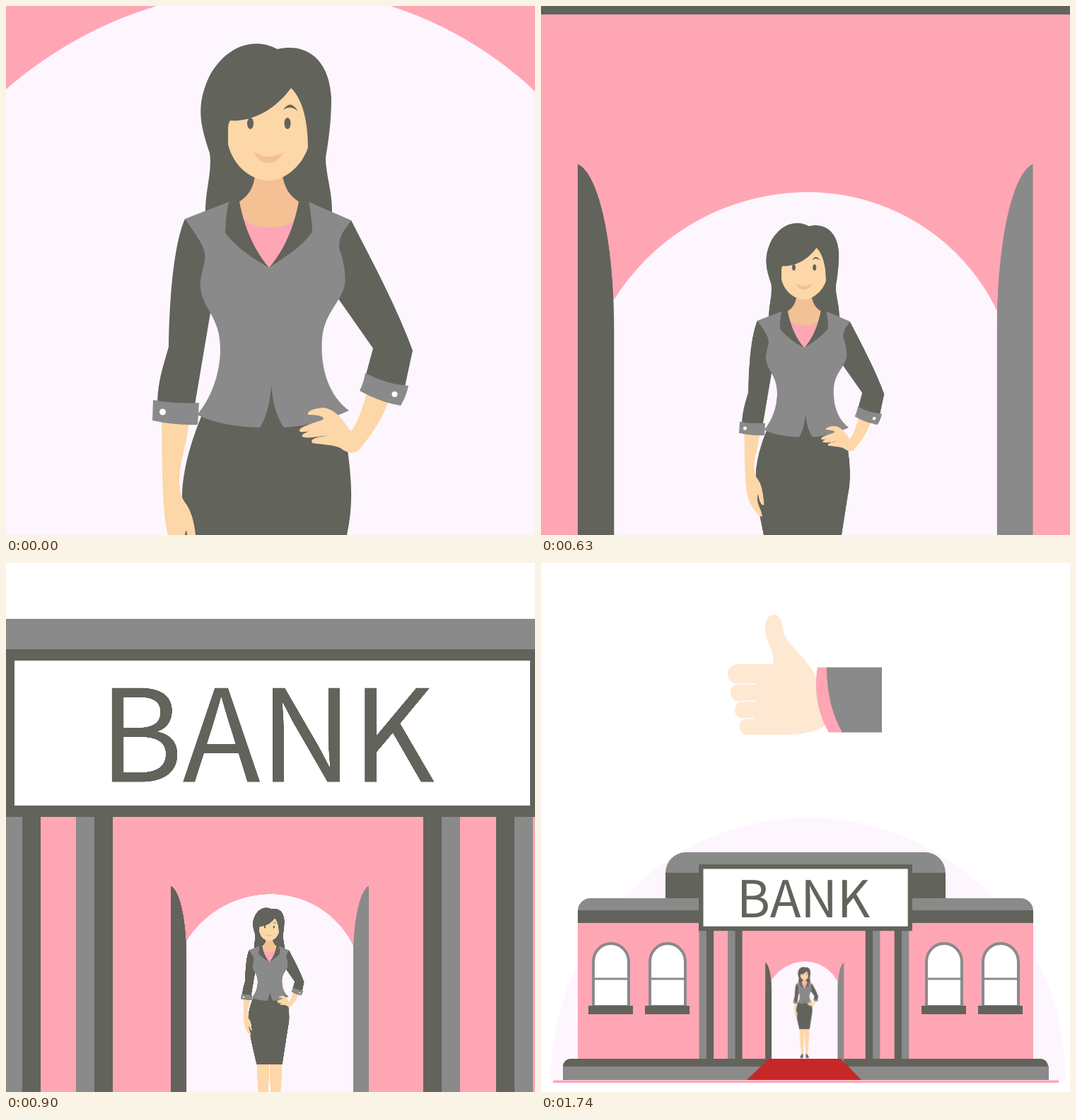
Animation of 748 by 748 pixels, one loop 3.42 s. Source, as an HTML page without scripts:

```html
<!DOCTYPE html>
<html lang="en">
<head>
<meta charset="utf-8">
<title>Bank</title>
<style>
  html, body { margin: 0; width: 100%; height: 100%; overflow: hidden; background: #fff; }
  svg { display: block; width: 100vw; height: 100vh; }

  .dark { fill: #62635b; }
  .gray { fill: #8a8a8a; }
  .pink { fill: #ffa6b5; }
  .pale { fill: #fef6fe; }
  .skin { fill: #fdd7a8; }
  .tan { fill: #f3c194; }
  .white { fill: #fff; }

  .sign {
    font: 400 72px "Noto Sans CJK JP", "Noto Sans CJK SC", "Noto Sans CJK", "Open Sans", sans-serif;
    letter-spacing: -.4px;
    text-rendering: geometricPrecision;
  }

  .zoom, .thumb, .carpet { animation: 3420ms linear -3ms infinite; }
  .zoom { transform-origin: 372.5px 626.3px; animation-name: zoom; }
  .doors { transform-origin: 372.5px 636.3px; }
  .thumb { transform-origin: 373px 159px; animation-name: thumb; }
  .carpet { fill: #c62828; animation-name: unroll; }

  /* camera pulls back at 30 ms per step */
  @keyframes zoom {
    0% { transform: scale(10.39); }
    7.018% { transform: scale(10.39); animation-timing-function: steps(13, end); }
    18.421% { transform: scale(5.79); animation-timing-function: steps(12, end); }
    28.947% { transform: scale(1.43); animation-timing-function: step-end; }
    29.825%, 100% { transform: scale(1); }
  }
  @keyframes thumb {
    0% { transform: rotate(36deg) scale(0); }
    35.088% { transform: rotate(36deg) scale(0); animation-timing-function: cubic-bezier(.215, .61, .355, 1); }
    50.877%, 100% { transform: none; }
  }
  @keyframes unroll {
    0%, 35.088% { d: path("M326 701L420 701L415 701L331 701Z"); }
    50.877%, 100% { d: path("M322 701L424 701L453 731L291 731Z"); }
  }
</style>
</head>
<body>
<svg viewBox="0 0 748 748">
  <defs>
    <g id="window">
      <path d="M7 91V28A25 26 0 0 1 57 28V91Z" fill="#fff" stroke="#8a8a8a" stroke-width="4"/>
      <rect class="gray" x="7" y="50.5" width="50" height="3"/>
      <rect class="dark" y="90" width="63" height="12"/>
    </g>
    <g id="pillar">
      <rect class="gray" width="10.4" height="182"/>
      <rect class="dark" x="10.3" width="10.3" height="182"/>
    </g>
    <g id="leg">
      <path class="skin" d="M301 960C298 1100 318 1200 326 1345H352C356 1200 372 1100 371 960Z"/>
      <path class="dark" d="M326 1345L352 1325V1390H306Q310 1370 326 1345Z"/>
    </g>
  </defs>

  <path class="pale" d="M14 732A364 372 0 0 1 742 732Z"/>

  <g class="zoom">
    <path class="gray" d="M176 438A29 29 0 0 1 205 409H543A29 29 0 0 1 572 438Z"/>
    <rect class="dark" x="176" y="438" width="396" height="36"/>
    <path class="gray" d="M52 492A18 18 0 0 1 70 474H678A18 18 0 0 1 696 492Z"/>
    <rect class="dark" x="52" y="491" width="644" height="18"/>
    <rect class="pink" x="52" y="509" width="644" height="193"/>

    <use href="#window" x="67" y="536"/>
    <use href="#window" x="147" y="536"/>
    <use href="#window" x="538" y="536"/>
    <use href="#window" x="618" y="536"/>

    <path class="pale" d="M325.9 590A55.9 55.9 0 0 1 373.4 563.6A51.2 51.2 0 0 1 419.6 592.7V702H325.9Z"/>

    <use href="#pillar" x="223.5" y="520"/>
    <use href="#pillar" x="264" y="520"/>
    <use href="#pillar" transform="matrix(-1 0 0 1 479.4 520)"/>
    <use href="#pillar" transform="matrix(-1 0 0 1 520.3 520)"/>

    <rect class="dark" x="223" y="426.2" width="302" height="94"/>
    <rect class="white" x="229.5" y="432.5" width="289.2" height="81.3"/>
    <text class="sign dark" x="276.8" y="500.6">BANK</text>

    <path class="gray" d="M31 711H718V731H31Z"/>
    <path class="dark" d="M31 712A11 11 0 0 1 42 701H706A11 11 0 0 1 717 712Z"/>
    <rect class="pink" x="17" y="731.5" width="715" height="3.5"/>
  </g>

  <g class="zoom doors">
    <path class="dark" d="M317.1 565C322 567 326 583 326 606V702L317.1 711Z"/>
    <path class="gray" d="M428.3 565C423.5 567 419.5 583 419.5 606V702L428.3 711Z"/>
  </g>

  <g class="zoom">
    <!-- woman, drawn at close-up size -->
    <g transform="translate(372.5 626.3) scale(.09625) translate(-372.5 -626.3)">
      <use href="#leg"/>
      <use href="#leg" transform="matrix(-1 0 0 1 745 0)"/>
      <path class="dark" d="M285 560L375 528L460 560L483 628C490 680 490 710 482 748L448 966H297C262 820 250 760 249 700C248 660 262 610 285 560Z"/>

      <path class="dark" d="M384 61C340 38 300 70 285 105C268 145 276 172 288 208C292 235 281 262 282 295H461C462 262 452 240 452 214C458 180 460 155 460 130C457 75 425 52 384 61Z"/>
      <path class="pink" d="M328 285H416L414 330L372 370L330 330Z"/>
      <path class="tan" d="M352 240C349 262 340 270 328 278L336 300C348 317 394 317 407 303L416 278C404 270 395 262 391 240Z"/>
      <path class="skin" d="M317 162C350 164 382 145 403 116C418 130 427 160 427 200C418 228 392 247 372 247C348 247 322 228 314 196V174C314 168 315 165 317 162Z"/>
      <ellipse class="dark" cx="345.5" cy="166" rx="4.5" ry="8"/>
      <ellipse class="dark" cx="398" cy="166" rx="4.5" ry="8"/>
      <path class="dark" d="M392 147Q402 131 413 149Q402 139 392 147Z"/>
      <path class="tan" d="M351 206C362 215 380 215 392 206C388 217 380 222 371 222C362 222 355 217 351 206Z"/>

      <path class="skin" d="M220 588H259C255 625 246 640 245 672C246 690 249 697 256 706C266 722 268 745 270 768C264 772 258 760 255 741C250 750 254 765 262 783L266 798C255 798 236 770 231 755C224 735 222 700 221 660Z"/>
      <path class="dark" d="M253 301C236 340 231 420 230 482C222 510 215 530 214 560L267 564L290 428V340Z"/>
      <path class="dark" d="M488 303C520 365 552 425 575 487L564 538L561 548L506 532L519 484L465 407L460 340Z"/>
      <path class="gray" d="M253 301L315 277L330 330L372 370L414 330L428 277L488 303C480 315 470 325 471 342C478 362 482 385 478 398C472 420 450 435 447 470C444 510 455 550 485 572C455 586 425 594 393 596C382 580 377 560 375 535C374 560 368 582 359 596C325 595 295 590 270 578C290 555 303 520 303 485C303 455 292 440 284 425C272 403 273 390 280 365C284 345 280 340 253 301Z"/>
      <path class="dark" d="M315 278L330 276C336 310 350 345 372 370C345 355 325 340 310 321C311 300 312 288 315 278Z"/>
      <path class="dark" d="M414 276H428C431 292 433 310 433 320C418 340 395 355 372 370C394 345 408 310 414 276Z"/>

      <path class="gray" d="M208 557Q240 563 273 561L271 592Q238 593 207 586Z"/>
      <circle class="white" cx="221.5" cy="574" r="4.5"/>

      <path class="skin" d="M511 545L541 558C530 590 512 612 498 629C490 634 480 631 473 625C462 620 445 620 433 618C430 612 435 611 455 607C440 609 426 612 419 609C418 604 425 602 452 596C438 600 425 603 416 602C412 598 420 594 448 585C452 580 440 578 427 578C425 573 435 569 448 568C465 569 477 586 487 601C494 596 502 575 511 545Z"/>
      <path class="gray" d="M508 519Q538 535 569 537Q566 552 558 565Q528 560 500 544Q506 532 508 519Z"/>
      <circle class="white" cx="549.5" cy="549" r="4"/>
    </g>
  </g>

  <path class="carpet" d="M326 701L420 701L415 701L331 701Z"/>

  <g class="thumb">
    <path fill="#ffe8d2" d="M327 143C332 135 326 125 321 112C315 95 314 74 330 73C341 74 341 88 343 97C348 118 380 135 390 165L404 229C390 239 365 243 345 243H292A11.5 11.5 0 0 1 292 220H286A12.2 12.2 0 0 1 286 195.5H280A12.2 12.2 0 0 1 280 171H278A14 14 0 0 1 278 143Z"/>
    <path d="M278 171H304M281 195.5H303M286 220H301" stroke="#fff" stroke-width="1.6" stroke-linecap="round"/>
    <path class="pink" d="M391 147.5H406L428 239.5H407C392 215 385 180 391 147.5Z"/>
    <path class="gray" d="M404 147.5H482V239.5H426C412 215 404 185 404 147.5Z"/>
  </g>
</svg>
</body>
</html>
```
